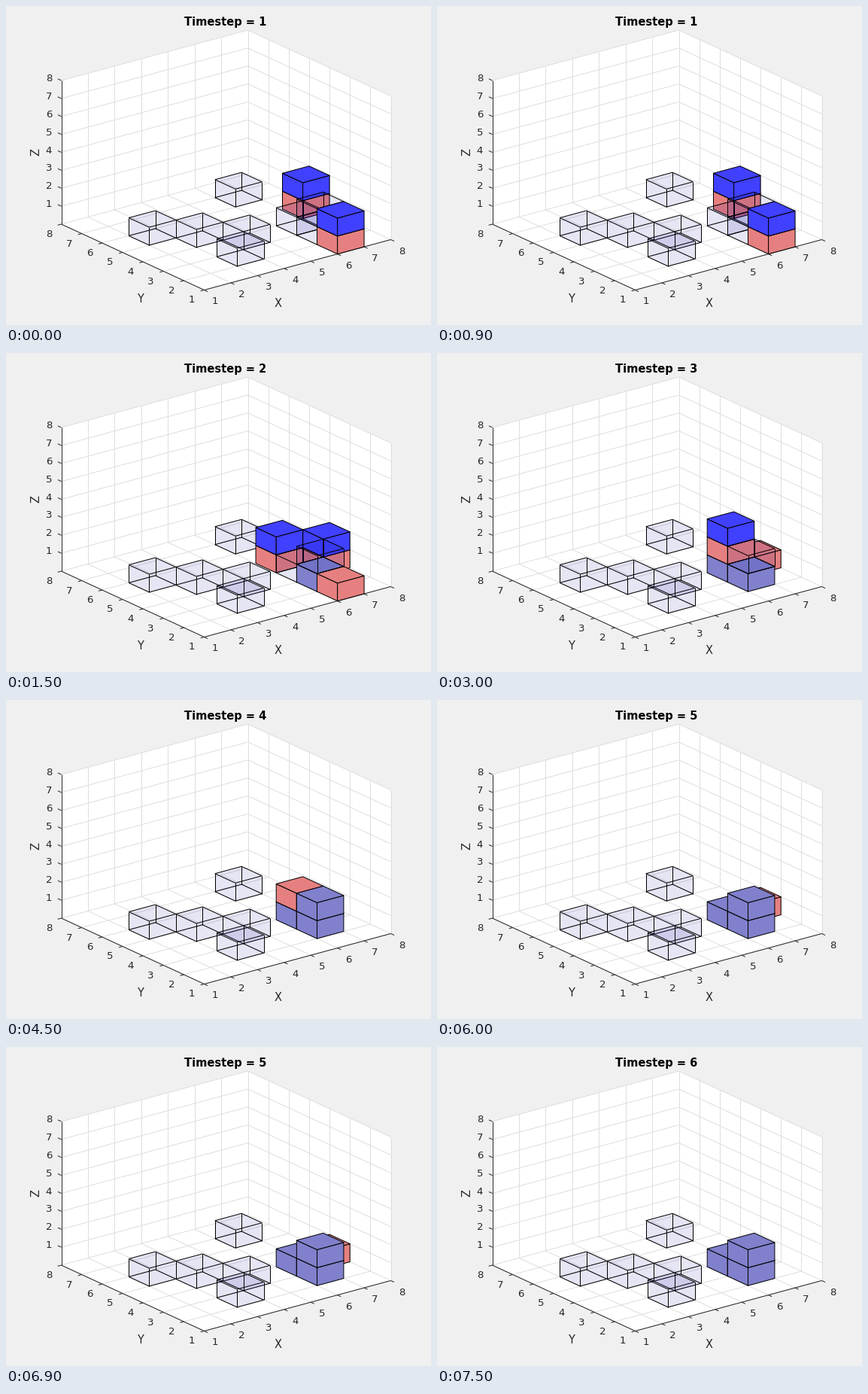
Animation of 565x424 px, one loop 8000 ms. Source, as a matplotlib script:

```python
import numpy as np
import matplotlib.pyplot as plt
from matplotlib.animation import FuncAnimation
from matplotlib.patches import Polygon

W, H, DPI = 565, 424, 100
PX = 72 / DPI  # points per pixel

# Orthographic projection onto the stage, in pixels
ORIGIN = np.array([263.5, 377.5])
EX = np.array([248, -67]) / 7
EY = np.array([-190, -87.5]) / 7
EZ = np.array([0, -191]) / 8

RED, BLUE, PURPLE = "#e68080", "#4040ff", "#8080cc"
INK = "#262626"
GRID = "#dedede"

TARGETS = [(2, 5, 0), (3, 4, 0), (4, 3, 0), (3, 2, 0), (6, 6, 0),
           (6, 3, 0), (6, 2, 0), (6, 2, 1)]

# Per timestep: robots, carried blocks, placed blocks
STEPS = [
    ([(6, 1, 0), (7, 4, 0)], [(6, 1, 1), (7, 4, 1)], []),
    ([(6, 1, 0), (7, 3, 0), (6, 4, 0)], [(7, 3, 1), (6, 4, 1)], [(6, 2, 0)]),
    ([(6, 3, 1), (7, 3, 0)], [(6, 3, 2)], [(6, 2, 0), (6, 3, 0)]),
    ([(6, 3, 1)], [], [(6, 2, 0), (6, 3, 0), (6, 2, 1)]),
    ([(7, 3, 0)], [], [(6, 2, 0), (6, 3, 0), (6, 2, 1)]),
    ([], [], [(6, 2, 0), (6, 3, 0), (6, 2, 1)]),
]

fig = plt.figure(figsize=(W / DPI, H / DPI), dpi=DPI, facecolor="#f0f0f0")
ax = fig.add_axes([0, 0, 1, 1])
ax.set_xlim(0, W)
ax.set_ylim(H, 0)
ax.axis("off")


def project(x, y, z):
    return ORIGIN + (x - 1) * EX + (y - 1) * EY + z * EZ


def segment(p, q, color, zorder, width=1.0):
    xs, ys = zip(p, q)
    return ax.plot(xs, ys, color=color, lw=width * PX, zorder=zorder,
                   solid_capstyle="butt")[0]


def fill(points, color, zorder, **kw):
    return ax.add_patch(Polygon(points, closed=True, fc=color, zorder=zorder, **kw))


def label(x, y, s, size=13.33, color=INK, **kw):
    return ax.text(x, y, s, fontsize=size * PX, color=color, ha="center",
                   va="center_baseline", family="DejaVu Sans", **kw)


def draw_axes():
    hull = [(1, 1, 0), (8, 1, 0), (8, 1, 8), (8, 8, 8), (1, 8, 8), (1, 8, 0)]
    fill([project(*c) for c in hull], "white", 0, lw=0)
    for t in range(1, 9):
        for a, b in [((t, 1, 0), (t, 8, 0)), ((t, 8, 0), (t, 8, 8)),
                     ((1, t, 0), (8, t, 0)), ((8, t, 0), (8, t, 8)),
                     ((1, 8, t), (8, 8, t)), ((8, 1, t), (8, 8, t))]:
            segment(project(*a), project(*b), GRID, 1)
    for end in [(8, 1, 0), (1, 8, 0)]:
        segment(project(1, 1, 0), project(*end), INK, 2)
    segment(project(1, 8, 0), project(1, 8, 8), INK, 2)

    out_x, out_y = -EY / np.hypot(*EY), -EX / np.hypot(*EX)
    for t in range(1, 9):
        for p, out, shift in [(project(t, 1, 0), out_x, (14.5, 14)),
                              (project(1, t, 0), out_y, (-16.5, 12)),
                              (project(1, 8, t), -out_x, (-16.5, -4))]:
            segment(p, p + 5 * out, INK, 2)
            label(*(p + shift), str(t))
    label(362, 393.5, "X", 14.67)
    label(178.5, 388.5, "Y", 14.67)
    label(39.5, 195, "Z", 14.67, rotation=90)


def corners(cube):
    x, y, z = cube
    return {(i, j, k): project(x + i, y + j, z + k)
            for i in (0, 1) for j in (0, 1) for k in (0, 1)}


def solid(cube, color, zorder):
    c = corners(cube)
    faces = [[(0, 0, 0), (0, 1, 0), (0, 1, 1), (0, 0, 1)],
             [(0, 0, 0), (1, 0, 0), (1, 0, 1), (0, 0, 1)],
             [(0, 0, 1), (1, 0, 1), (1, 1, 1), (0, 1, 1)]]
    return [fill([c[k] for k in f], color, zorder, ec="black", lw=PX,
                 joinstyle="round") for f in faces]


def ghost(cube, zorder):
    c = corners(cube)
    outline = [(0, 0, 0), (1, 0, 0), (1, 0, 1), (1, 1, 1), (0, 1, 1), (0, 1, 0)]
    parts = [fill([c[k] for k in outline], "#000099", zorder, alpha=0.1, lw=0)]
    for a in c:
        for b in c:
            if a < b and sum(np.abs(np.subtract(a, b))) == 1:
                parts.append(segment(c[a], c[b], "black", zorder))
    return parts


draw_axes()
title = label(291.5, 20, "", 14.67, "black", weight="bold")
drawn = []


def update(i):
    step = min(i // 3, len(STEPS) - 1)
    robots, carried, placed = STEPS[step]
    while drawn:
        drawn.pop().remove()
    cubes = [(c, color) for group, color in
             zip(STEPS[step], (RED, BLUE, PURPLE)) for c in group]
    cubes += [(c, None) for c in TARGETS if c not in placed]
    # Far cubes first
    cubes.sort(key=lambda e: e[0][2] - e[0][0] - e[0][1])
    for n, (cube, color) in enumerate(cubes):
        z = 10 + n
        drawn.extend(solid(cube, color, z) if color else ghost(cube, z))
    title.set_text(f"Timestep = {step + 1}")
    return drawn + [title]


anim = FuncAnimation(fig, update, frames=16, interval=500, repeat=True,
                     init_func=lambda: update(0), blit=False)
plt.show()
```
